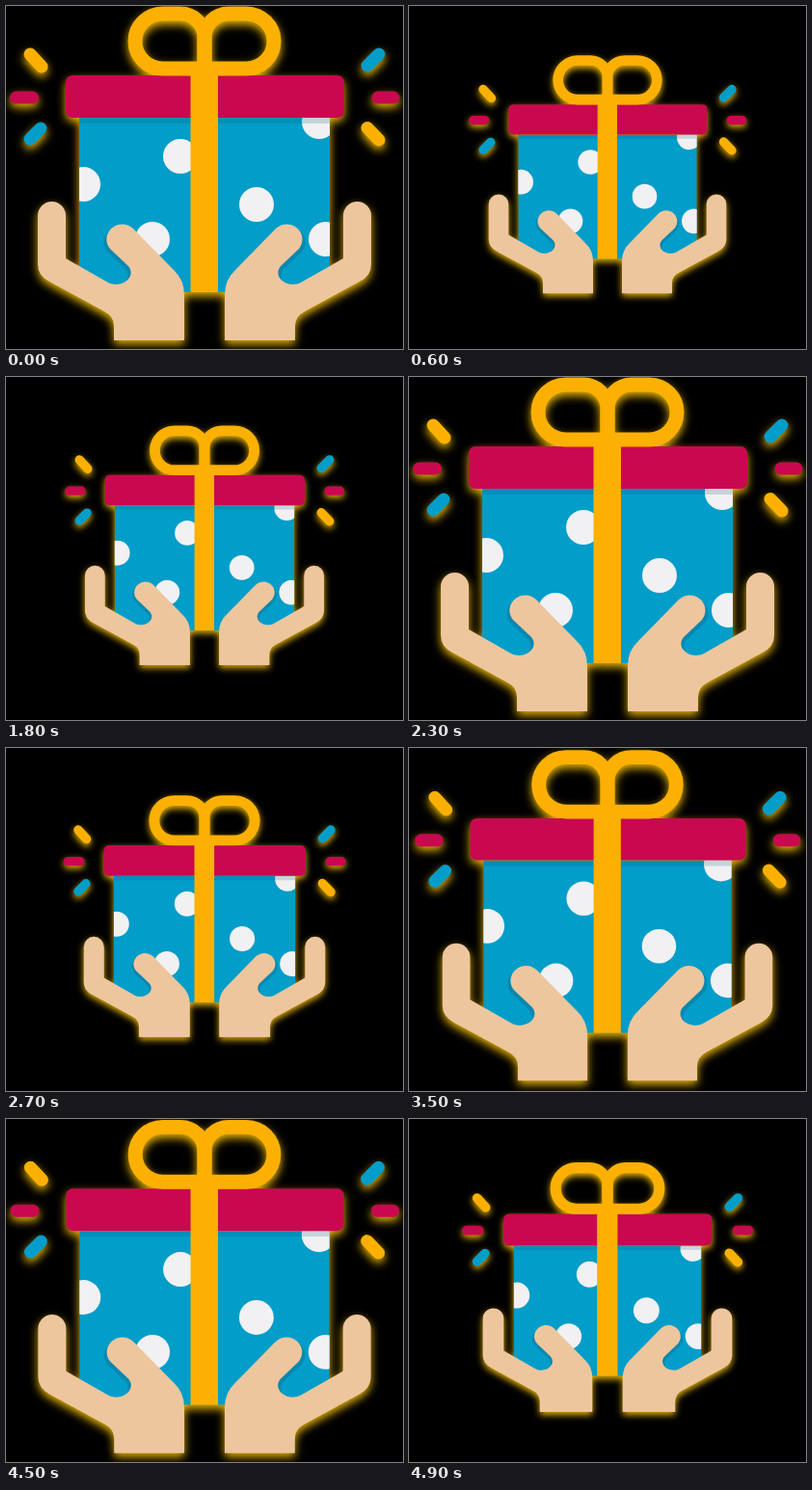
Animation, 412 px wide and 356 px high, one loop 5 s. Source, as an HTML page:

```html
<!DOCTYPE html>
<html lang="en">
<head>
<meta charset="utf-8">
<title>Gift</title>
<style>
  html, body { margin: 0; width: 100%; height: 100%; overflow: hidden; background: #000; }
  svg { display: block; width: 100%; height: 100%; }
  #gift { filter: drop-shadow(0 4px 5px #e6b400); }
</style>
</head>
<body>
<svg viewBox="0 0 412 356">
  <defs>
    <clipPath id="box"><rect x="76" y="116" width="260" height="181"/></clipPath>
    <path id="hand" d="M33 217.500A14.500 14.500 0 0 1 62 217.500V262L106 287C120 294 136 281 127 270
      L108 252C96 236 117 218 132 231L174 274Q185 284 185 300V347H112V332Q112 322 102 317L45 286Q33 280 33 268Z"/>
    <path id="loop" d="M206 65H162.500A28.500 28.500 0 0 1 162.500 8H181A25 25 0 0 1 206 33Z"/>
  </defs>
  <g id="gift">
    <g clip-path="url(#box)">
      <path fill="#029dc9" d="M76 116H336V297H76Z"/>
      <g fill="#f1f1f3">
        <circle cx="80" cy="185" r="18"/>
        <circle cx="181" cy="156" r="18"/>
        <circle cx="152" cy="242" r="18"/>
        <circle cx="260" cy="206" r="18"/>
        <circle cx="325" cy="120" r="18"/>
        <circle cx="332" cy="242" r="18"/>
      </g>
      <path fill="#00506a" opacity=".18" d="M76 116H336V122H76Z"/>
      <g fill="#0788b0">
        <use href="#hand" x="-3" y="3"/>
        <use href="#hand" x="-3" y="3" transform="matrix(-1 0 0 1 412 0)"/>
      </g>
    </g>
    <rect x="62" y="72" width="289" height="44" rx="7" fill="#c9084f"/>
    <path fill="#fbb003" d="M191.500 60H220V297H191.500Z"/>
    <g fill="none" stroke="#fbb003" stroke-width="15" stroke-linejoin="round">
      <use href="#loop"/>
      <use href="#loop" transform="matrix(-1 0 0 1 412 0)"/>
    </g>
    <g fill="#eec69e">
      <use href="#hand"/>
      <use href="#hand" transform="matrix(-1 0 0 1 412 0)"/>
    </g>
    <g fill="none" stroke-width="13" stroke-linecap="round">
      <path stroke="#fbb003" d="M25 50L37 63M375 126.500L387 139"/>
      <path stroke="#c9084f" d="M10.500 95H27.500M386 95H402"/>
      <path stroke="#029dc9" d="M25 138L36 127M375 62L387 50"/>
    </g>
  </g>
</svg>
<script>
const gift = document.getElementById('gift');
const LOOP = 5000, STEP = 100, BEAT = 1140, SMALL = 0.713;

// cubic-bezier(.4, 0, .2, 1)
function ease(x) {
  if (x <= 0) return 0;
  if (x >= 1) return 1;
  let lo = 0, hi = 1, p;
  for (let i = 0; i < 20; i++) {
    p = (lo + hi) / 2;
    const q = 1 - p;
    if (1.2 * q * q * p + 0.6 * q * p * p + p * p * p < x) lo = p; else hi = p;
  }
  return p * p * (3 - 2 * p);
}

function scaleAt(t) {
  const beat = t % BEAT;
  const shrink = ease((beat - 20) / 530) - ease((beat - 620) / 520);
  return 1 - (1 - SMALL) * shrink;
}

function draw() {
  const t = Math.floor((performance.now() + 10) % LOOP / STEP) * STEP;
  gift.setAttribute('transform', `translate(206 177) scale(${scaleAt(t)}) translate(-206 -177)`);
  requestAnimationFrame(draw);
}
draw();
</script>
</body>
</html>
```
